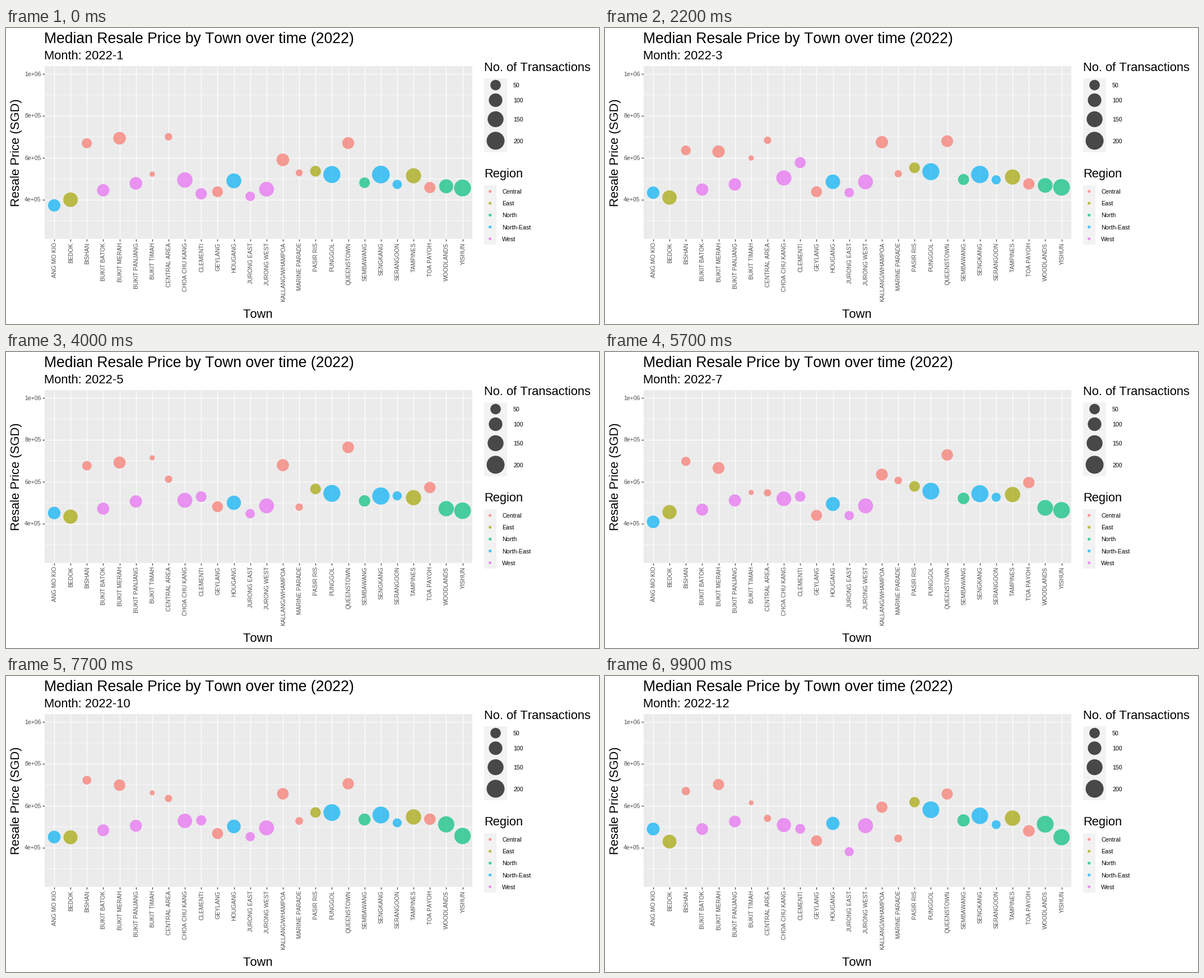
A matplotlib script that plays this animation: 1058x529 px, repeating every 10000 ms.

```python
import numpy as np
import matplotlib.pyplot as plt
from matplotlib.animation import FuncAnimation
from matplotlib.patches import Circle, Rectangle

W, H, DPI = 1058, 529, 64
FRAMES, INTERVAL = 100, 100
LEFT, RIGHT, TOP, BOTTOM = 68.5, 832, 67.5, 377
STEP = (RIGHT - LEFT) / 26.2

COLORS = {
    "Central": "#F8766D",
    "East": "#A3A500",
    "North": "#00BF7D",
    "North-East": "#00B0F6",
    "West": "#E76BF3",
}

plt.rcParams["font.family"] = "Liberation Sans"
plt.rcParams["text.kerning_factor"] = 6  # plain advance widths
fig = plt.figure(figsize=(W / DPI, H / DPI), dpi=DPI, facecolor="white")
ax = fig.add_axes([0, 0, 1, 1])
ax.set_xlim(0, W)
ax.set_ylim(H, 0)
ax.axis("off")


def px(n):
    """Pixels to points."""
    return n * 72 / DPI


def label(x, y, s, size, color="black", ha="left", rot=0):
    return ax.text(x, y, s, fontsize=px(size), color=color, ha=ha,
                   va="baseline", rotation=rot, rotation_mode="anchor", zorder=5)


def line(xs, ys, color, width, z=2):
    ax.plot(xs, ys, color=color, lw=px(width), solid_capstyle="butt", zorder=z)


def box(x0, y0, x1, y1, color):
    ax.add_patch(Rectangle((x0, y0), x1 - x0, y1 - y0, fc=color, ec="none", zorder=1))


def dot(x, y, r, color):
    return ax.add_patch(Circle((x, y), r, fc=color, ec="none", alpha=0.7, zorder=4))


def price_y(thousands):
    return 81.5 + (1000 - thousands) * 0.375


def radius(sales):
    return 2.7 + 0.94 * np.sqrt(sales)


class Town:
    """Bubble whose price runs straight between (month, price) turning points."""

    count = 0

    def __init__(self, name, region, sales, start, end, *turns):
        self.x = LEFT + STEP * (0.6 + Town.count)
        Town.count += 1
        self.months, self.prices = zip((1, start), *turns, (12, end))
        self.sales = sales
        self.disc = dot(self.x, 0, 1, COLORS[region])
        line([self.x] * 2, [TOP, BOTTOM], "white", 1.3, 3)
        line([self.x] * 2, [BOTTOM, BOTTOM + 4], "#333333", 1.2)
        label(self.x + 4, 383.5, name, 10.4, "#4D4D4D", "right", 90)

    def move(self, month):
        self.disc.center = self.x, price_y(np.interp(month, self.months, self.prices))
        self.disc.radius = radius(np.interp(month, (1, 12), self.sales))


# Panel, grid and value axis
box(LEFT, TOP, RIGHT, BOTTOM, "#EBEBEB")
for p in range(300, 1001, 100):
    y = price_y(p)
    major = p % 200 == 0
    line([LEFT, RIGHT], [y, y], "white", 1.3 if major else 0.7, 3 if major else 2)
    if major:
        line([LEFT - 4, LEFT], [y, y], "#333333", 1.2)
        label(62.5, y + 4, f"{p * 1000:.0e}", 10.5, "#4D4D4D", "right")

# Sales from first to last month, first and last price, then turning points
towns = [
    Town("ANG MO KIO", "North-East", (78, 86), 372, 488,
         (2.2, 383), (3.4, 432), (5.4, 451), (8, 393), (9, 451), (10.6, 448)),
    Town("BEDOK", "East", (120, 106), 399, 428, (3.4, 409), (8, 462)),
    Town("BISHAN", "Central", (45, 26), 668, 669, (3.4, 633), (5.4, 675), (10.6, 732)),
    Town("BUKIT BATOK", "West", (78, 69), 444, 488, (3.4, 447), (5.4, 471), (8.6, 463), (10.6, 503)),
    Town("BUKIT MERAH", "Central", (84, 60), 692, 700, (3.4, 627), (5.4, 691), (7.3, 664), (8.6, 696)),
    Town("BUKIT PANJANG", "West", (84, 69), 477, 524, (3.4, 471), (5.4, 505), (8.6, 513), (10.6, 493)),
    Town("BUKIT TIMAH", "Central", (5, 3), 521, 613,
         (3.4, 595), (5.4, 717), (7.3, 547), (8.6, 583), (10.6, 745)),
    Town("CENTRAL AREA", "Central", (18, 16), 699, 539, (3.4, 684), (7.3, 545), (10.6, 675)),
    Town("CHOA CHU KANG", "West", (139, 112), 493, 507, (10.6, 531)),
    Town("CLEMENTI", "West", (62, 42), 427, 489, (3.4, 577), (5.4, 528), (10.6, 530)),
    Town("GEYLANG", "Central", (55, 58), 437, 432, (3.4, 436), (5.4, 481), (7.3, 439), (8.6, 435), (10.6, 501)),
    Town("HOUGANG", "North-East", (127, 94), 489, 515, (3.4, 484), (5.4, 499), (8.6, 489), (10.6, 513)),
    Town("JURONG EAST", "West", (38, 34), 415, 380, (5.4, 447), (7.3, 437), (8.6, 463), (10.6, 439)),
    Town("JURONG WEST", "West", (125, 130), 449, 504, (3.4, 484), (7.3, 484)),
    Town("KALLANG/WHAMPOA", "Central", (84, 60), 589, 592, (3.4, 673), (5.4, 679), (7.3, 632), (8.6, 681)),
    Town("MARINE PARADE", "Central", (14, 22), 527, 443,
         (3.4, 524), (5.4, 475), (7.3, 609), (8.6, 460), (10.6, 599)),
    Town("PASIR RIS", "East", (55, 49), 535, 616, (7.3, 577), (8.6, 577), (10.6, 556)),
    Town("PUNGGOL", "North-East", (178, 170), 519, 580),
    Town("QUEENSTOWN", "Central", (72, 60), 669, 655, (3.4, 676), (5.4, 764), (7.3, 727), (8.6, 723)),
    Town("SEMBAWANG", "North", (52, 78), 480, 529, (10.6, 540)),
    Town("SENGKANG", "North-East", (194, 166), 519, 551, (3.4, 519), (10.6, 561)),
    Town("SERANGOON", "North-East", (35, 31), 472, 509, (3.4, 493), (5.4, 532)),
    Town("TAMPINES", "East", (132, 138), 513, 540, (3.4, 507), (8.6, 548)),
    Town("TOA PAYOH", "Central", (60, 66), 457, 479, (3.4, 472), (5.4, 571), (8.6, 611), (10.6, 452)),
    Town("WOODLANDS", "North", (110, 172), 463, 511, (7.3, 474), (10.6, 527)),
    Town("YISHUN", "North", (172, 158), 455, 449, (8.6, 465), (10.6, 444)),
]

# Titles
label(68.5, 27, "Median Resale Price by Town over time (2022)", 26.5)
subtitle = label(68.5, 56, "", 22)
label(449.5, 517.5, "Town", 22, ha="center")
label(24, 222.5, "Resale Price (SGD)", 22, ha="center", rot=90)

# Legends
label(853, 77, "No. of Transactions", 22)
box(853, 90, 894, 222, "#F2F2F2")
for n, y in ((50, 102), (100, 129), (150, 163), (200, 201.5)):
    dot(873.5, y, radius(n), "black")
    label(905, y + 4, str(n), 10.6)

label(853, 267.5, "Region", 22)
box(853, 281, 874.5, 387, "#F2F2F2")
for k, (region, color) in enumerate(COLORS.items()):
    y = 292 + 21.2 * k
    dot(863.7, y, 2.6, color)
    label(885, y + 4, region, 10.6)


def update(i):
    month = 1 + 11 * i / (FRAMES - 1)
    subtitle.set_text(f"Month: 2022-{round(month)}")
    for town in towns:
        town.move(month)
    return [subtitle] + [town.disc for town in towns]


anim = FuncAnimation(fig, update, frames=FRAMES, interval=INTERVAL,
                     repeat=True, repeat_delay=0, blit=False)
plt.show()
```
